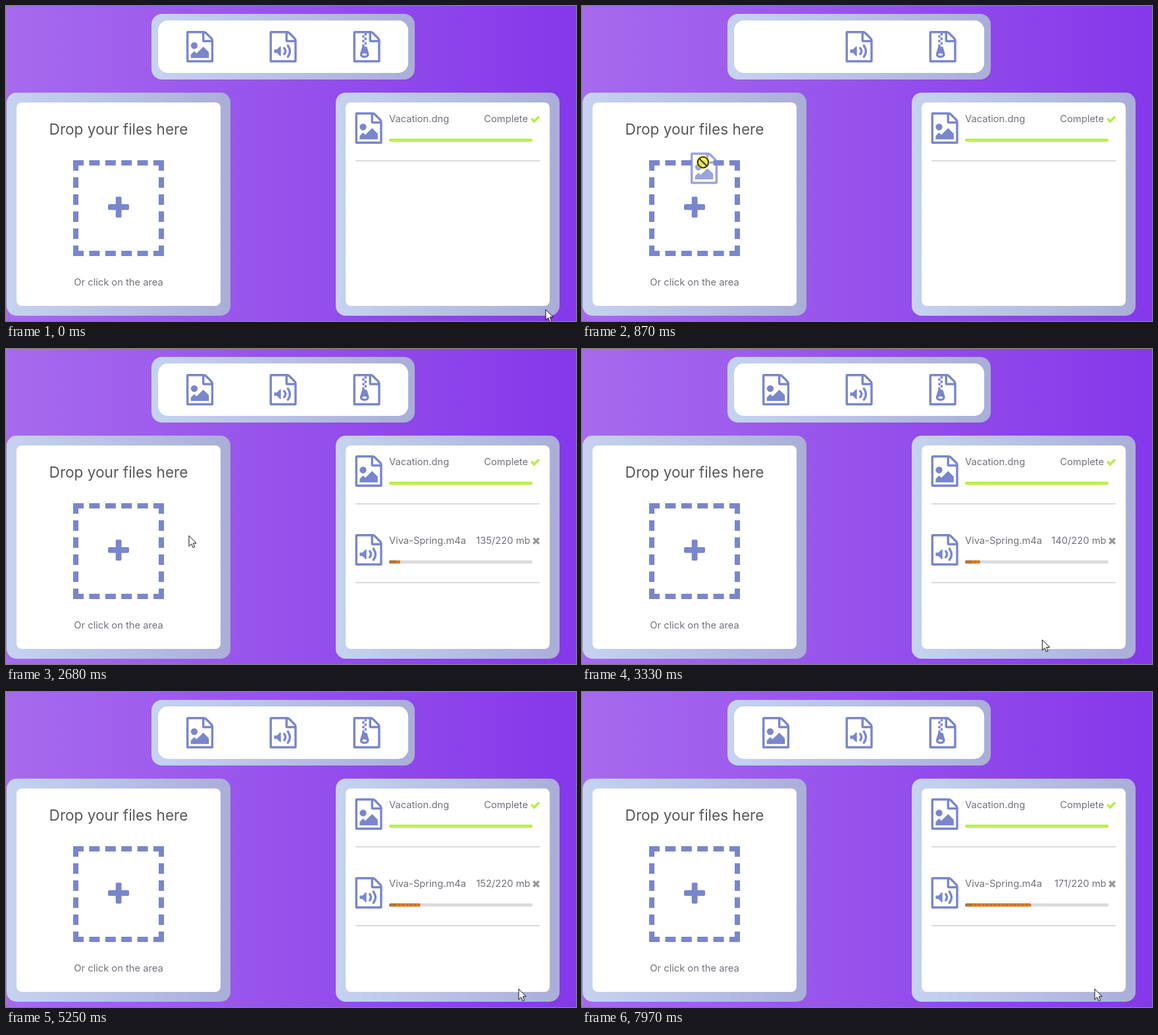
An HTML page for the animation above (8 s loop, 866 by 480 pixels).

```html
<!DOCTYPE html>
<html lang="en">
<head>
<meta charset="utf-8">
<title>File upload</title>
<style>
  html, body { margin: 0; width: 100%; height: 100%; overflow: hidden; }
  svg { display: block; width: 866px; height: 480px; }
  text { font: 14.7px Inter, "Open Sans", sans-serif; fill: #71717c; }
  .title { font-size: 22.6px; fill: #57575b; }
  .end { text-anchor: end; }
  .mid { text-anchor: middle; }
  .ink { fill: #7986cb; }
  .line { fill: none; stroke: #7986cb; }
</style>
</head>
<body>
<svg viewBox="0 0 866 480">
  <defs>
    <linearGradient id="sky">
      <stop stop-color="#a76aed"/><stop offset="1" stop-color="#8538ea"/>
    </linearGradient>
    <linearGradient id="frame">
      <stop stop-color="#c5d3f0"/><stop offset="1" stop-color="#aaaed8"/>
    </linearGradient>
    <pattern id="stripes" width="6" height="5" x="593" y="322" patternUnits="userSpaceOnUse">
      <path fill="#ee7d0c" d="M0 0H6V5H0Z"/>
      <path fill="#a5774a" d="M3 0H5L6 2.5 5 5H3L4 2.5Z"/>
    </pattern>

    <!-- icons on a 24 x 28 grid -->
    <path id="sheet" class="ink" fill-rule="evenodd" d="M22.94 5.94Q24 7 24 8.5V26.5A1.5 1.5 0 0 1 22.5 28H1.5A1.5 1.5 0 0 1 0 26.5V1.5A1.5 1.5 0 0 1 1.5 0H15.5Q17 0 18.06 1.06ZM16 2.13V8H21.88L21.5 7.36 16.64 2.47ZM22 26V10H15.5A1.5 1.5 0 0 1 14 8.5V2H2V26Z"/>
    <g id="image" transform="scale(1.714)">
      <use href="#sheet"/>
      <path class="ink" d="M20 19V24H4V21L7 18 9 20 15 14Z"/>
      <circle class="ink" cx="7" cy="13" r="3"/>
    </g>
    <g id="audio" transform="scale(1.714)">
      <use href="#sheet"/>
      <path class="ink" d="M4.5 16.5H6.5L9.1 13.9Q10 13 10 14.3V21.7Q10 23 9.1 22.1L6.5 19.5H4.5Q4 19.5 4 19V17Q4 16.5 4.5 16.5Z"/>
      <path class="line" stroke-width="2" stroke-linecap="round" d="M12.9 15.2Q15.1 17.95 12.9 20.7M16.2 12.95Q19.8 17.95 16.2 22.95"/>
    </g>
    <g id="archive" transform="scale(1.714)">
      <use href="#sheet"/>
      <path class="ink" d="M10 2h2v2h-2zM8 4h2v2h-2zM10 6h2v2h-2zM8 8h2v2h-2zM10 10h2v2h-2z"/>
      <path class="ink" fill-rule="evenodd" d="M8 12H10V14H11.2Q12.1 14 12.4 14.7L13.9 20.2C14.6 22.6 12.5 24 10 24S5.4 22.6 6.1 20.2L8 14ZM8 21A2 1 0 0 0 12 21 2 1 0 0 0 8 21Z"/>
    </g>
  </defs>

  <rect width="866" height="480" fill="url(#sky)"/>

  <rect x="221" y="12" width="400" height="100" rx="16" fill="url(#frame)"/>
  <rect x="231" y="22" width="380" height="80" rx="15" fill="#fff"/>
  <g id="shelfImage"><use href="#image" x="0" transform="translate(274 38)"/></g>
  <use href="#audio" transform="translate(400.5 38)"/>
  <use href="#archive" transform="translate(527.5 38)"/>

  <rect x="1" y="132" width="340" height="340" rx="15" fill="url(#frame)"/>
  <rect x="16" y="147" width="310" height="310" rx="8" fill="#fff"/>
  <text class="title mid" x="171" y="196">Drop your files here</text>
  <g id="zone">
    <path class="line" stroke-width="8" stroke-dasharray="16 8.4" d="M102 239H240M102 377H240"/>
    <path class="line" stroke-width="8" stroke-dasharray="16 10" d="M106 235V381M236 235V381"/>
    <rect class="ink" x="155" y="302" width="32" height="8.8" rx="2"/>
    <rect class="ink" x="166.7" y="290.4" width="8.8" height="32" rx="2"/>
  </g>
  <text class="mid" x="171" y="426">Or click on the area</text>

  <rect x="501" y="132" width="340" height="340" rx="15" fill="url(#frame)"/>
  <rect x="516" y="147" width="310" height="310" rx="8" fill="#fff"/>
  <g>
    <use href="#image" transform="translate(530.5 162)"/>
    <text x="582" y="177">Vacation.dng</text>
    <text class="end" x="793" y="177">Complete</text>
    <path fill="none" stroke="#b9ee4b" stroke-width="3.8" d="M798.3 171.6L802.5 175.8 809.8 168.5"/>
    <rect x="582" y="202" width="218" height="5" rx="2.5" fill="#bcef4f"/>
    <rect x="531" y="235" width="280" height="2" fill="#dcdcdc"/>
  </g>
  <g id="upload">
    <use href="#audio" transform="translate(530.5 282)"/>
    <text x="582" y="297">Viva-Spring.m4a</text>
    <text id="count" class="end" x="796.5" y="297"></text>
    <path stroke="#9a9a9a" stroke-width="3.6" d="M801.3 288.3L809.7 296.7M809.7 288.3L801.3 296.7"/>
    <rect x="582" y="322" width="218" height="5" rx="2.5" fill="#dcdcdc"/>
    <rect id="bar" x="582" y="322" height="5" rx="2.5" fill="url(#stripes)"/>
    <rect x="582" y="322" width="11" height="5" rx="2.5" fill="#b0773f"/>
    <rect x="531" y="355" width="280" height="2" fill="#dcdcdc"/>
  </g>

  <g id="pointer">
    <use id="dragged" href="#image" transform="translate(-19 -15)" opacity=".75"/>
    <circle id="press" r="10.5" fill="#ffff3c" opacity=".75"/>
    <path id="arrow" fill="#fff" stroke="#111" d="M0 .5V16.5L3.7 13 6.1 18.7 8.7 17.6 6.3 12H11.2Z"/>
    <path id="hand" fill="#fff" stroke="#222" d="M-1.8 13V1.8A1.8 1.8 0 0 1 1.8 1.8V8Q3.5 7 5 8.6 7 8 8 9.6 10.5 9 10.5 11.5V15Q10.5 18 8.8 20V23.5H-1V21L-6 14.5Q-7 12.5 -5 12-3.5 12-1.8 14Z"/>
    <g id="denied" fill="none" stroke="#33330a" stroke-width="2">
      <circle r="8.2"/><path d="M-5.8 -5.8L5.8 5.8"/>
    </g>
  </g>
</svg>
<script>
  const LOOP = 8000;
  const GRAB = 500, ENTER = 930, DROP = 1140;

  // [time, x, y]
  const pointerPath = [
    [0, 820, 462], [70, 820, 462], [430, 293, 53], [GRAB, 293, 53],
    [870, 184, 238], [ENTER, 180, 250], [1000, 172, 266], [1430, 172, 266],
    [1940, 278, 284], [2700, 278, 284], [3300, 690, 440], [3460, 738, 453],
    [3990, 775, 453], [4320, 779, 452], [LOOP, 779, 452]
  ];
  // [time, width]
  const barWidth = [
    [0, 11], [DROP, 11], [2040, 13.5], [2680, 17], [3495, 24.5], [3990, 30],
    [5215, 47], [6075, 62.5], [6570, 72], [7970, 100.5], [LOOP, 101]
  ];

  const el = id => document.getElementById(id);
  const show = (id, on) => el(id).style.display = on ? '' : 'none';

  function at(steps, t) {
    const i = steps.findIndex(s => s[0] > t);
    const [a, b] = [steps[i - 1], steps[i]];
    const k = (t - a[0]) / (b[0] - a[0]);
    return a.slice(1).map((v, n) => v + (b[n + 1] - v) * k);
  }

  function megabytes(t) {
    if (t < 1280) return 125;
    if (t < 1480) return 126;
    return 125 + Math.floor((t - 1060) / 150);
  }

  function render(t) {
    const [x, y] = at(pointerPath, t);
    const dragging = t >= GRAB && t < DROP;
    const denied = dragging && t < ENTER;
    const hand = t >= DROP && x < 240;

    el('pointer').setAttribute('transform', `translate(${x} ${y})`);
    show('dragged', dragging);
    show('press', dragging);
    show('denied', denied);
    show('hand', hand);
    show('arrow', !denied && !hand);
    show('shelfImage', !dragging);
    el('zone').setAttribute('opacity', t >= ENTER && t < DROP ? 0.6 : 1);

    show('upload', t >= DROP);
    el('count').textContent = `${megabytes(t)}/220 mb`;
    el('bar').setAttribute('width', at(barWidth, t)[0]);
  }

  const start = performance.now();
  function tick() {
    render((performance.now() - start) % LOOP);
    requestAnimationFrame(tick);
  }
  tick();
</script>
</body>
</html>
```
